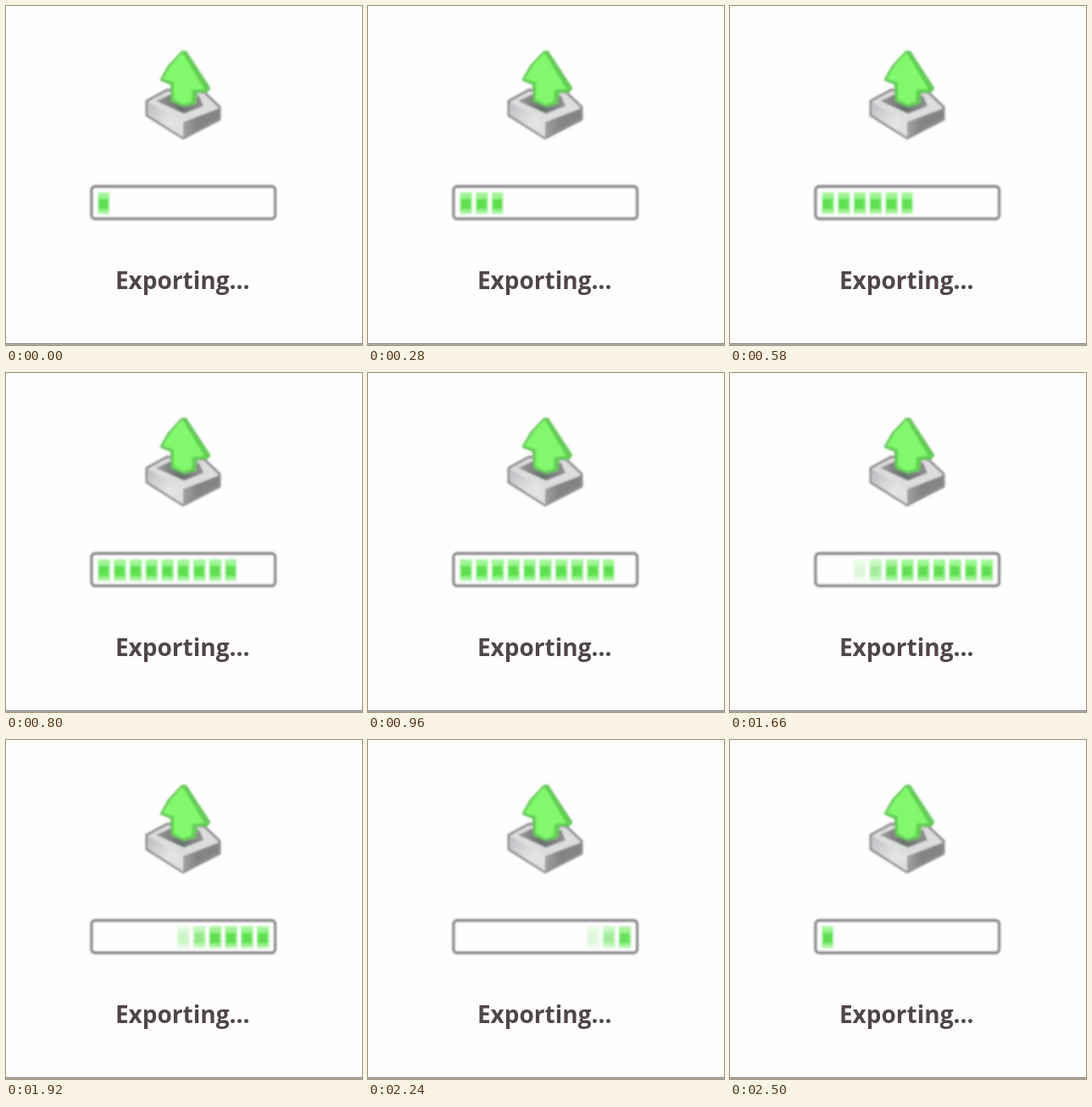
These frames come from a looping animation (420x400 px, 2520 ms). An HTML page:

```html
<!DOCTYPE html>
<html lang="en">
<head>
<meta charset="utf-8">
<title>Exporting</title>
<style>
html, body { margin: 0; width: 100%; height: 100%; overflow: hidden; background: #fefefe; }
svg { display: block; width: 420px; height: 400px; }
text { font: 700 28px "Open Sans", sans-serif; fill: #504648; }
</style>
</head>
<body>
<svg viewBox="0 0 420 400">
  <defs>
    <linearGradient id="left" x1="0" y1="0" x2="1" y2="1">
      <stop offset="0" stop-color="#bdbbbf"/><stop offset=".6" stop-color="#e4e3e5"/><stop offset="1" stop-color="#dddcdf"/>
    </linearGradient>
    <linearGradient id="right" x1="0" y1="0" x2="1" y2="0">
      <stop offset="0" stop-color="#a3a1a4"/><stop offset=".4" stop-color="#858386"/><stop offset="1" stop-color="#858386"/>
    </linearGradient>
    <linearGradient id="well" x1="0" y1="0" x2="1" y2="0">
      <stop offset="0" stop-color="#9d9b9e"/><stop offset=".5" stop-color="#68706a"/><stop offset="1" stop-color="#939194"/>
    </linearGradient>
    <linearGradient id="cell" x1="0" y1="0" x2="0" y2="1">
      <stop offset="0" stop-color="#b4f7aa"/><stop offset=".3" stop-color="#8df282"/>
      <stop offset=".75" stop-color="#86ee7b"/><stop offset="1" stop-color="#b6f7ae"/>
    </linearGradient>
    <filter id="soft" x="-20%" y="-20%" width="140%" height="140%"><feGaussianBlur stdDeviation=".9"/></filter>
    <filter id="ink"><feGaussianBlur stdDeviation=".5"/></filter>
  </defs>
  <rect width="420" height="400" fill="#fefefe"/>

  <g filter="url(#soft)" stroke-linejoin="round">
    <path d="M166 112 190 99 234 102 252 119 252 134 209 156 166 129Z" fill="#dddcdf" stroke="#8f8d91" stroke-width="3"/>
    <path d="M167 113 209 137 209 155 167 128Z" fill="url(#left)"/>
    <path d="M209 137 251 121 251 133 209 155Z" fill="url(#right)"/>
    <path d="M177 112 197 103 228 106 233 118 210 127Z" fill="url(#well)"/>
    <path d="M208 54 212 54 240 97 237 101 225 102 223 115 210 118 196 112 195 92 183 87 192 71Z"
      fill="#62cf55" stroke="#6ac75f" stroke-width="2.6"/>
    <path d="M208 55 234 98 220 99 219 113 209 116 198 110 198 90 185 86 194 71Z" fill="#82f96c"/>
  </g>

  <g filter="url(#soft)">
    <rect x="101" y="213" width="216.5" height="38" rx="4" fill="#fefefe" stroke="#878488" stroke-width="3.3"/>
    <g id="cells"></g>
  </g>
  <text x="128.9" y="334" filter="url(#ink)">Exporting...</text>
  <rect y="398" width="420" height="1.5" fill="#777"/>
</svg>
<script>
const LOOP = 2520, COUNT = 11, PITCH = 18.75;
const FADE_START = 1250, FADE_STEP = 97, FADE_TIME = 270;
const NS = "http://www.w3.org/2000/svg";
const cells = document.getElementById("cells");
const clamp = v => Math.max(0, Math.min(1, v));

function rect(parent, x, y, w, h, fill) {
  const el = document.createElementNS(NS, "rect");
  Object.entries({ x, y, width: w, height: h, fill }).forEach(([k, v]) => el.setAttribute(k, v));
  parent.appendChild(el);
  return el;
}

const blocks = Array.from({ length: COUNT }, (_, i) => {
  const g = document.createElementNS(NS, "g");
  const x = 108.4 + i * PITCH;
  const body = rect(g, x, 219.5, 14, 26, "url(#cell)");
  rect(g, x + 1.2, 228, 11, 11.5, "#5fdf50");
  cells.appendChild(g);
  return { g, body };
});

function draw(t) {
  blocks.forEach(({ g, body }, i) => {
    const age = t - i * 100;
    const left = 1 - clamp((t - FADE_START - i * FADE_STEP) / FADE_TIME);
    // the first block returns just before the loop closes
    const restart = i === 0 && t >= 2490;
    g.setAttribute("opacity", restart ? 1 : age >= 0 ? left : 0);
    body.setAttribute("width", age < 100 || restart ? 13.5 : 14.5);
  });
}

function tick() {
  draw(performance.now() % LOOP);
  requestAnimationFrame(tick);
}
tick();
</script>
</body>
</html>
```
